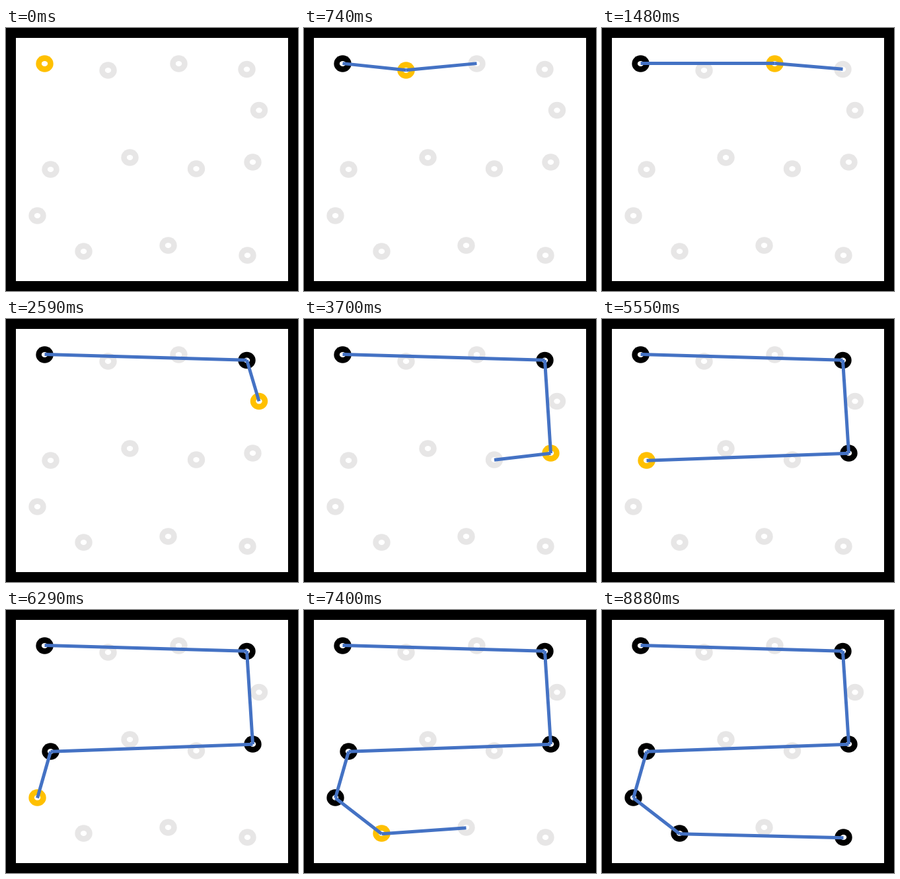
Animation of 442 by 398 pixels, one loop 9.25 s. Source, as an HTML page with a canvas:

```html
<!DOCTYPE html>
<html lang="en">
<head>
<meta charset="utf-8">
<title>Line simplification</title>
<style>
  html, body { margin: 0; width: 100%; height: 100%; overflow: hidden; background: #000; }
  canvas { display: block; }
</style>
</head>
<body>
<canvas id="stage" width="442" height="398"></canvas>
<script>
const canvas = document.getElementById('stage');
const ctx = canvas.getContext('2d');

const STEP_MS = 370, TOLERANCE = 20, BORDER = 15;
const GREY = '#e7e6e6', ORANGE = '#ffc000', BLACK = '#000', WHITE = '#fff', BLUE = '#4472c4';

const points = [
  [58.5, 54], [154.5, 64], [261.5, 54], [364.5, 62.5], [383, 124.5],
  [373.5, 203], [288, 213], [187.5, 196], [67.5, 214], [47.5, 284],
  [117.5, 338], [245.5, 329], [365.5, 344]
];

function distanceToLine([px, py], [ax, ay], [bx, by]) {
  const dx = bx - ax, dy = by - ay;
  return Math.abs(dx * (py - ay) - dy * (px - ax)) / Math.hypot(dx, dy);
}

// Record every state of the simplification: join a candidate, look ahead, keep or drop it.
function simplify() {
  const steps = [];
  const last = points.length - 1;
  const kept = [];
  const record = (active, ...ahead) => steps.push({ kept: [...kept], active, path: [...kept, ...ahead] });

  record(0, 0);
  kept.push(0);
  record();
  for (let i = 1; i < last; i++) {
    if (i > 1) record(i, i);
    record(i, i, i + 1);
    const anchor = points[kept.at(-1)];
    if (distanceToLine(points[i], anchor, points[i + 1]) > TOLERANCE) kept.push(i);
  }
  record(last, last);
  kept.push(last);
  record();
  return steps;
}

function fillEllipse(x, y, rx, ry, color) {
  ctx.fillStyle = color;
  ctx.beginPath();
  ctx.ellipse(x, y, rx, ry, 0, 0, Math.PI * 2);
  ctx.fill();
}

function drawRing([x, y], color) {
  fillEllipse(x, y, 13.2, 12.8, color);
  fillEllipse(x, y, 4.7, 4, WHITE);
}

// The lines are spread vertically a touch wider than the rings.
const lineY = y => y + (y - 150) / 250;

function drawSegment([x1, y1], [x2, y2]) {
  ctx.beginPath();
  ctx.moveTo(x1, lineY(y1));
  ctx.lineTo(x2, lineY(y2));
  ctx.stroke();
}

function drawStep({ kept, active, path }) {
  const { width, height } = canvas;
  ctx.fillStyle = BLACK;
  ctx.fillRect(0, 0, width, height);
  ctx.fillStyle = WHITE;
  ctx.fillRect(BORDER, BORDER, width - 2 * BORDER, height - 2 * BORDER);

  points.forEach((point, i) =>
    drawRing(point, i === active ? ORANGE : kept.includes(i) ? BLACK : GREY));

  ctx.strokeStyle = BLUE;
  ctx.lineWidth = 5;
  for (let i = 1; i < path.length; i++) drawSegment(points[path[i - 1]], points[path[i]]);
}

const steps = simplify();
const start = performance.now();
function tick() {
  const elapsed = performance.now() - start;
  drawStep(steps[Math.floor(elapsed / STEP_MS) % steps.length]);
  requestAnimationFrame(tick);
}
tick();
</script>
</body>
</html>
```
